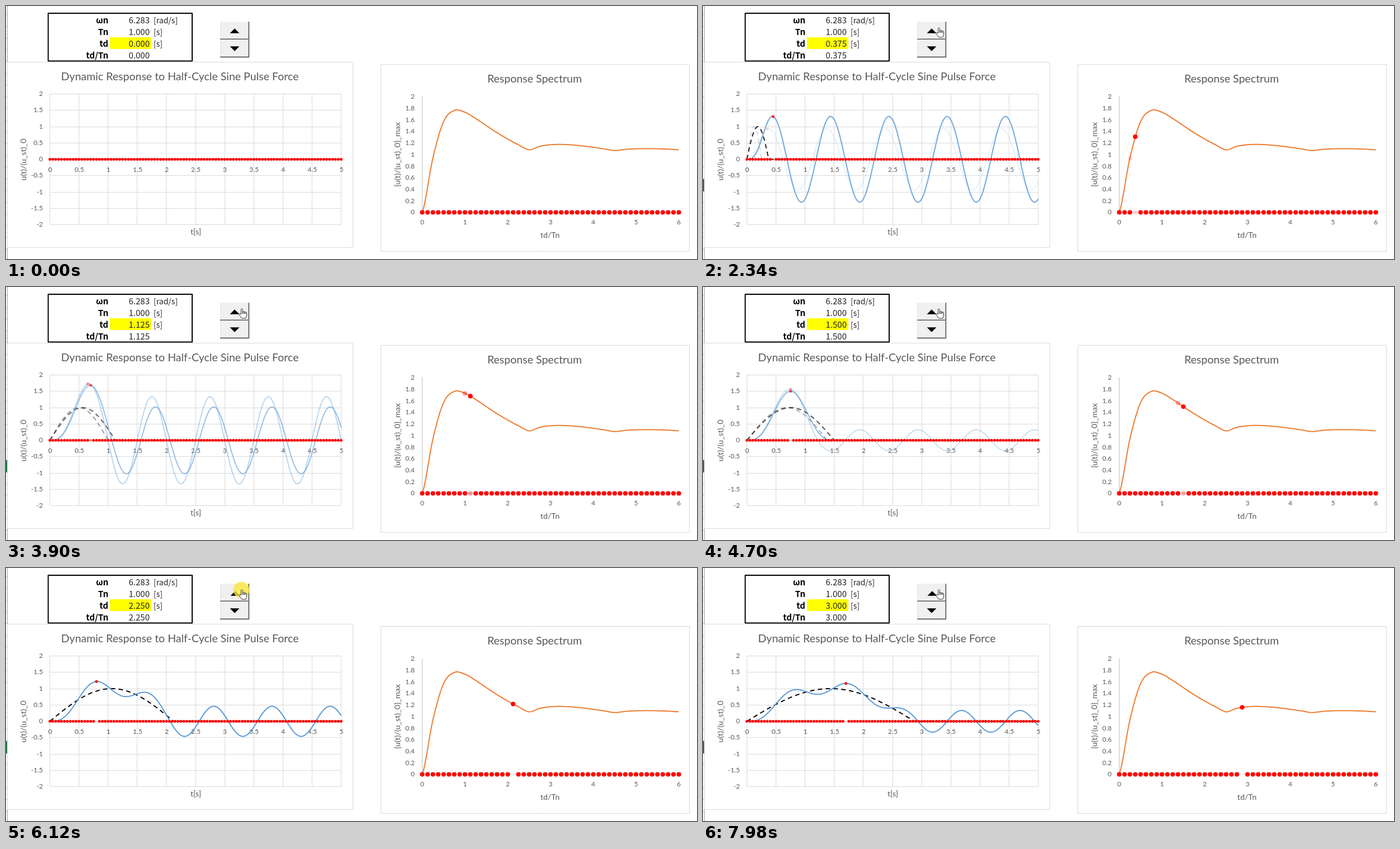
An HTML page with a canvas for the animation above (8 s loop, 1236 by 453 pixels).

```html
<!DOCTYPE html>
<html lang="en">
<head>
<meta charset="utf-8">
<title>Half-cycle sine pulse response</title>
<style>
  html, body { margin: 0; width: 100%; height: 100%; overflow: hidden; background: #fff; }
  canvas { display: block; }
</style>
</head>
<body>
<canvas id="stage" width="1236" height="453"></canvas>
<script>
const ctx = document.getElementById('stage').getContext('2d');
const LOOP = 8000, STEP = 0.125, DT = 0.05, PI = Math.PI;
const CHART = 'Lato, sans-serif', CELL = '"Noto Sans CJK SC", "Noto Sans", sans-serif';
const GREY = '#595959', GRID = '#d9d9d9', RED = '#ff0000';

// [time in ms, step of td] pairs; linear in between
const KNOTS = [[1600, 1], [2900, 6], [4510, 12], [6010, 18], [7270, 22], [7900, 24], [8215, 25]];

const clamp = v => Math.max(0, Math.min(1, v));
const lx = t => 78.5 + t * 104.2, ly = u => 274.5 - u * 58.5;
const rx = r => 744.5 + r * 76.5, ry = u => 369.5 - u * 103.5;

// Undamped response (Tn = 1) to a half-cycle sine of length td
function response(t, td) {
  if (td <= 0) return 0;
  if (Math.abs(td - 0.5) < 1e-4) td = 0.5002;
  const b = 1 / (2 * td);
  if (t <= td) return (Math.sin(PI * t / td) - b * Math.sin(2 * PI * t)) / (1 - b * b);
  return 2 * b * Math.cos(PI * td) / (b * b - 1) * Math.sin(2 * PI * (t - td / 2));
}
const force = (t, td) => t < td ? Math.sin(PI * t / td) : 0;

function peak(td, dt) {
  let best = { i: -1, u: 0 };
  for (let i = 0; i * dt <= 5.001; i++) {
    const u = response(i * dt, td);
    if (u > best.u + 1e-9) best = { i, u };
  }
  return best;
}
const peaks = Array.from({ length: 26 }, (_, i) => peak(i * STEP, DT));
const nodes = Array.from({ length: 25 }, (_, i) => peak(i / 4, 0.01).u);

// Smooth line through the spectrum nodes, x counted in nodes
function spectrum(x) {
  const i = Math.min(23, Math.floor(x)), t = x - i;
  const a = nodes[i], b = nodes[i + 1];
  const m = (b - (nodes[i - 1] ?? a)) / 2, k = ((nodes[i + 2] ?? b) - a) / 2;
  return a + m * t + (3 * (b - a) - 2 * m - k) * t * t + (2 * (a - b) + m + k) * t ** 3;
}

function stepAt(t) {
  if (t < KNOTS[0][0]) return 0.99;
  let i = 0;
  while (i < KNOTS.length - 2 && t >= KNOTS[i + 1][0]) i++;
  const [a, p] = KNOTS[i], [b, q] = KNOTS[i + 1];
  return p + (t - a) / (b - a) * (q - p);
}

function text(str, x, y, size, { align = 'center', family = CHART, color = GREY, weight = 400, turn = 0 } = {}) {
  ctx.save();
  ctx.translate(x, y);
  ctx.rotate(turn);
  ctx.font = `${weight} ${size}px ${family}`;
  ctx.textAlign = align;
  ctx.fillStyle = color;
  ctx.fillText(str, 0, size * 0.36);
  ctx.restore();
}
function line(x1, y1, x2, y2, color = GRID, width = 1) {
  ctx.strokeStyle = color;
  ctx.lineWidth = width;
  ctx.beginPath();
  ctx.moveTo(x1, y1);
  ctx.lineTo(x2, y2);
  ctx.stroke();
}
function rect(x, y, w, h, fill) {
  ctx.fillStyle = fill;
  ctx.fillRect(x, y, w, h);
}
function frame(x, y, w, h, color, width) {
  ctx.strokeStyle = color;
  ctx.lineWidth = width;
  ctx.strokeRect(x, y, w, h);
}
function dot(x, y, r, alpha = 1, color = RED) {
  ctx.globalAlpha = alpha;
  ctx.fillStyle = color;
  ctx.beginPath();
  ctx.arc(x, y, r, 0, 2 * PI);
  ctx.fill();
  ctx.globalAlpha = 1;
}
function plot(fn, n, color, width, dash = []) {
  ctx.beginPath();
  for (let i = 0; i <= n; i++) ctx.lineTo(...fn(i));
  ctx.strokeStyle = color;
  ctx.lineWidth = width;
  ctx.lineJoin = 'round';
  ctx.setLineDash(dash);
  ctx.stroke();
  ctx.setLineDash([]);
}

function sheet(active) {
  for (let y = 15.5; y < 453; y += 21) line(0, y, 2, y, '#bfbfbf');
  line(2.5, 0, 2.5, 453, '#9f9f9f');
  if (active) rect(0, 310, 3, 22, '#217346');
}

// A changed value rolls in from above and pushes the previous one out
function rolling(now, before, y, p) {
  const opt = { align: 'right', family: CELL, color: '#222', weight: 300 };
  ctx.save();
  ctx.beginPath();
  ctx.rect(186, y - 11, 74, 21);
  ctx.clip();
  text(now.toFixed(3), 257, y - 21 * (1 - p), 15, opt);
  if (p < 1) text(before.toFixed(3), 257, y + 21 * p, 15, opt);
  ctx.restore();
}

function table(n, p) {
  rect(186, 56, 74, 21, '#ffff00');
  const rows = [['ωn', 26, '[rad/s]'], ['Tn', 47, '[s]'], ['td', 68, '[s]'], ['td/Tn', 89, '']];
  for (const [name, y, unit] of rows) {
    text(name, 183, y, 15, { align: 'right', family: CELL, color: '#000', weight: 700 });
    text(unit, 264, y, 14, { align: 'left', family: CELL, color: '#222', weight: 300 });
  }
  rolling(6.283, 0, 26, 1);
  rolling(1, 0, 47, 1);
  for (const y of [68, 89]) rolling(n * STEP, Math.max(0, n - 1) * STEP, y, p);
  frame(75.5, 13, 257.5, 85.5, '#000', 2);
}

function button(y, dir, shift) {
  rect(383, y, 52, 32, '#f0f0f0');
  line(383.5, y, 383.5, y + 32, '#e3e3e3');
  line(383, y + 31.5, 435, y + 31.5, '#555', 1.4);
  line(434.5, y, 434.5, y + 32, '#555', 1.4);
  line(384, y + 30.5, 434, y + 30.5, '#a8a8a8');
  line(433.5, y + 1, 433.5, y + 31, '#a8a8a8');
  const cx = 409 + shift, cy = y + 16.5 + shift;
  ctx.fillStyle = '#000';
  ctx.beginPath();
  ctx.moveTo(cx - 8.5, cy + 4.3 * dir);
  ctx.lineTo(cx + 8.5, cy + 4.3 * dir);
  ctx.lineTo(cx, cy - 4.3 * dir);
  ctx.fill();
}

function leftChart(n, p) {
  frame(2.5, 100.5, 618, 332, GRID, 1);
  text('Dynamic Response to Half-Cycle Sine Pulse Force', 311, 125.5, 19.55);
  for (let i = 0; i <= 10; i++) {
    const x = Math.round(lx(i / 2) + 0.5) - 0.5;
    line(x, 157, x, 391);
  }
  for (let i = -4; i <= 4; i++) {
    const y = Math.round(ly(i / 2) - 0.5) + 0.5;
    line(79, y, 600, y, i ? GRID : '#bfbfbf');
    text(String(i / 2), 66, y - 0.5, 12, { align: 'right' });
  }
  for (let i = 0; i <= 10; i++) text(String(i / 2), lx(i / 2) + 0.5, 292.5, 12);
  text('t[s]', 339.5, 404, 14.3);
  text('u(t)/(u_st)_0', 31, 275, 14.3, { turn: -PI / 2 });

  const old = Math.max(0, n - 1);
  const layers = [[old, 1 - p], [n, p]].filter(l => l[1] > 0);
  for (const [k, alpha] of layers) {
    const td = k * STEP;
    ctx.globalAlpha = alpha;
    plot(i => [lx(i / 100), ly(force(i / 100, td))], 500, '#000', 2, [8, 6]);
    plot(i => [lx(i / 100), ly(response(i / 100, td))], 500, '#5b9bd5', 2);
    ctx.globalAlpha = 1;
  }
  const a = peaks[old], b = peaks[n];
  for (let i = 0; i <= 100; i++) {
    let alpha = 1;
    if (i === a.i) alpha = a.i === b.i ? 0 : Math.min(1, 3 * p);
    else if (i === b.i) alpha = 1 - p;
    dot(lx(i * DT), ly(0), 2.5, alpha);
  }
  for (const [k, alpha] of layers)
    if (k) dot(lx(peaks[k].i * DT), ly(peaks[k].u), 2.5, alpha);
}

function rightChart(n, p) {
  frame(670.5, 104.5, 552, 335, GRID, 1);
  text('Response Spectrum', 945.5, 129.5, 19.55);
  line(744.5, 162, 744.5, 369, '#bfbfbf');
  line(744, 369.5, 1203, 369.5, GRID);
  for (let i = 0; i <= 10; i++) text(String(i / 5), 731, ry(i / 5) - 0.5, 12, { align: 'right' });
  for (let i = 0; i <= 6; i++) text(String(i), rx(i), 387, 12);
  text('td/Tn', 973, 409.5, 14.3);
  text('{u(t)/(u_st)_0}_max', 700, 266, 14.3, { turn: -PI / 2 });
  plot(i => [rx(i / 40), ry(spectrum(i / 10))], 240, '#ed7d31', 2);

  const old = Math.max(0, n - 1);
  for (let i = 0; i <= 48; i++) {
    let alpha = 1;
    if (n && i === n) alpha = 1 - p;
    else if (old && i === old) alpha = Math.min(1, 3 * p);
    dot(rx(i * STEP), ry(0), 4.1, alpha);
  }
  if (old && p < 1) dot(rx(old * STEP), ry(peaks[old].u), 4.1, 1 - p);
  if (n && p > 0) dot(rx(n * STEP), ry(peaks[n].u), 4.1);
}

function shape(path, x, y) {
  ctx.save();
  ctx.translate(x, y);
  ctx.fillStyle = '#fff';
  ctx.strokeStyle = '#333';
  ctx.lineWidth = 1;
  ctx.lineJoin = 'round';
  ctx.fill(path);
  ctx.stroke(path);
  ctx.restore();
}
const ARROW = new Path2D('M.5 .5V14.5L3.8 11.5L6 16.8L8.4 15.8L6.2 10.6H10.6Z');
const HAND = new Path2D('M4.5 11V1.8Q6 -.4 7.3 1.8V6Q9 4.8 10 6.4Q11.6 5.4 12.4 7Q14.2 6.4 14.5 8.4V13L12.8 18H5.8L1 11.6Q.4 9.4 2.6 9.6ZM7.3 6V10V6M10 6.6V10V6.6M12.4 7.2V10V7.2');

function pointer(t) {
  if (t < 70) return;
  if (t >= 1600) return shape(HAND, 416, 38);
  const q = clamp((t - 70) / 800), e = q * q * (3 - 2 * q);
  shape(ARROW, 995 + (421 - 995) * e, 453 + (38 - 453) * e);
}

function draw(t) {
  const s = stepAt(t), n = Math.floor(s), f = s - n;
  const moving = t >= 1600;
  const roll = moving ? clamp(f / 0.17) : 1;
  const fade = moving ? clamp((f - 0.44) / 0.48) : 1;
  const pressed = moving && f > 0.2 && f < 0.5;
  const glow = moving ? (f > 0.3 && f < 0.62 ? 1 : 0) : clamp((t - 900) / 300);

  rect(0, 0, 1236, 453, '#fff');
  sheet(t >= 1000);
  table(n, roll);
  button(28, 1, pressed ? 1 : 0);
  button(60, -1, 0);
  leftChart(n, fade);
  rightChart(n, fade);
  if (glow) dot(421, 39, 14.5, 0.8 * glow, '#f9e83c');
  pointer(t);
}

const start = performance.now();
function tick() {
  draw((performance.now() - start) % LOOP);
  requestAnimationFrame(tick);
}
tick();
</script>
</body>
</html>
```
